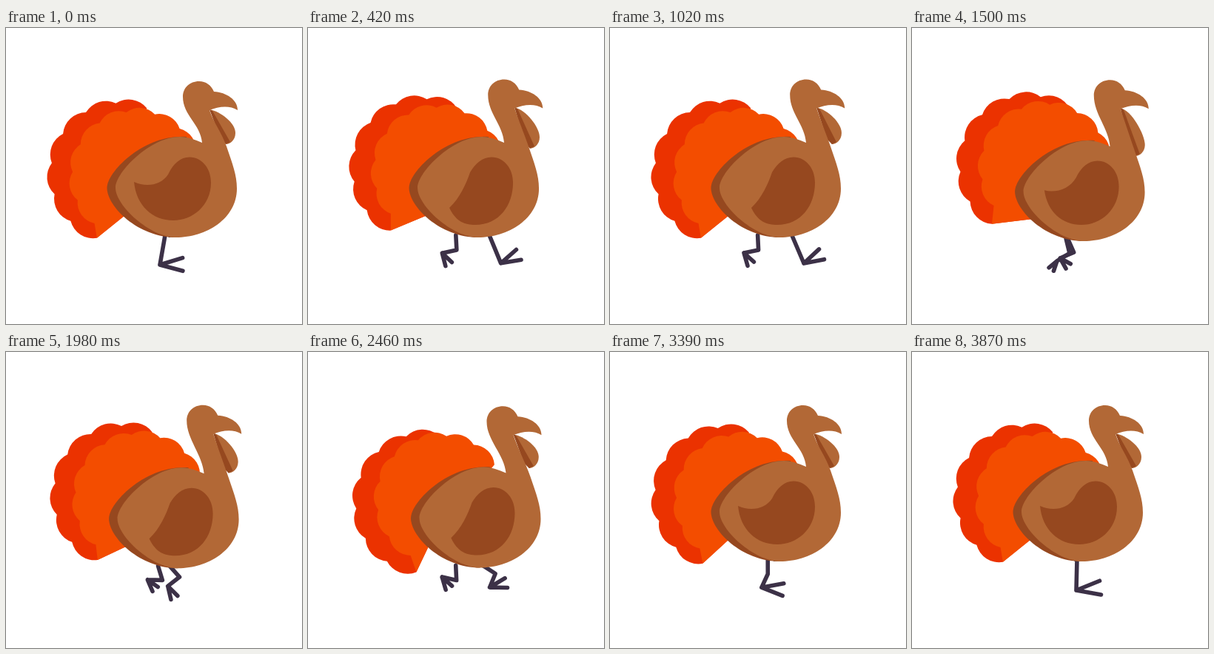
An HTML page that plays this animation: 400 by 400 pixels, repeating every 5960 ms.

```html
<!DOCTYPE html>
<html lang="en">
<head>
<meta charset="utf-8">
<title>Walking turkey</title>
<style>
html, body { margin: 0; height: 100%; overflow: hidden; background: #fff; }
svg { display: block; width: 100vw; height: 100vh; }
.leg { fill: none; stroke: #3c3147; stroke-width: 5.6; stroke-linecap: round; stroke-linejoin: round; }
.skin { fill: #b26836; }
.shade { fill: #96481f; }
</style>
</head>
<body>
<svg viewBox="0 0 400 400">
  <path id="fan" fill="#eb3200"/>
  <path id="fanTop" fill="#f34d00"/>
  <path id="legB" class="leg"/>
  <path id="legA" class="leg"/>
  <path id="back" class="shade"/>
  <path id="wattle" class="skin"/>
  <path id="fold" class="shade"/>
  <path id="body" class="skin"/>
  <path id="wing" class="shade"/>
</svg>
<script>
const LOOP = 5960, STEP = 30, LAST = 129, STRIDES = 7;
const BONE = 20, LOBE = 26;

// Foot poses: ankle x and y, tilt in degrees, toe length.
const foot = {
  reach:  [262, 318, -27, 28],
  land:   [246, 318, -16, 24],
  stand:  [222, 322, -6, 34],
  push:   [208, 320, -1, 32],
  trail:  [181, 304, 58, 18],
  gather: [200, 311, 45, 16],
  fold:   [196, 315, 125, 14],
  tuck:   [218, 266, 0, 8]
};
const gait = {
  legA: [[0, 'push'], [.4, 'trail'], [.69, 'gather'], [.76, 'reach'], [.83, 'reach'], [.946, 'stand'], [1, 'push']],
  legB: [[0, 'tuck'], [.4, 'land'], [.69, 'fold'], [.76, 'trail'], [.83, 'trail'], [.946, 'tuck'], [1, 'tuck']]
};

const ramp = (a, b, u) => {
  const s = Math.min(1, Math.max(0, (u - a) / (b - a)));
  return s * s * (3 - 2 * s);
};
const hump = (u, a, b, c, d) => ramp(a, b, u) - ramp(c, d, u);
const mix = (a, b, s) => a + (b - a) * s;

const set = (id, d) => document.getElementById(id).setAttribute('d', d);

const shift = (path, dx, dy) =>
  path.replace(/([\d.]+) ([\d.]+)/g, (m, x, y) => `${+x + dx} ${+y + dy}`);

const polar = (x, y, r, deg) => {
  const a = deg * Math.PI / 180;
  return `${x + r * Math.cos(a)} ${y + r * Math.sin(a)}`;
};

function scallops(x, y, r, start, count) {
  const bump = r / 3;
  let d = 'L' + polar(x, y, r, start);
  for (let i = 1; i <= count; i++)
    d += `A${bump} ${bump} 0 0 1 ${polar(x, y, r, start + LOBE * i)}`;
  return d + 'Z';
}

// Hip and ankle joined by two equal bones, knee bent forward.
function leg(id, u, bodyY) {
  const steps = gait[id], i = steps.findIndex(s => s[0] > u);
  const [from, a] = steps[i - 1], [to, b] = steps[i], s = ramp(from, to, u);
  const [x, y, tilt, len] = foot[a].map((v, k) => mix(v, foot[b][k], s));
  const hipX = 223 + .57 * (x - 222), hipY = 280 + bodyY;
  const dx = x - hipX, dy = y - hipY, dist = Math.hypot(dx, dy);
  const bend = Math.sqrt(Math.max(0, BONE * BONE - dist * dist / 4)) / dist * Math.sign(dy);
  const kneeX = (hipX + x) / 2 + dy * bend, kneeY = (hipY + y) / 2 - dx * bend;
  set(id, `M${hipX} ${hipY}L${kneeX} ${kneeY}L${x} ${y}`
    + `M${polar(x, y, len, tilt - 16)}L${x} ${y}L${polar(x, y, len, tilt + 16)}`);
}

function drawFan(u, dx, torso) {
  const sway = ramp(0, .385, u) - 2 * ramp(.385, .69, u) + ramp(.69, .83, u);
  const x = 155 + 1.6 * dx, y = 195.5 + 9.5 * sway, turn = 110 - 13 * sway;
  const root = torso('M161 253');
  set('fan', root + scallops(x, y, 94, turn, 7));
  set('fanTop', root + 'L' + polar(x, y, 94, turn)
    + scallops(x + 21, y + 3.5 - 9 * Math.max(0, sway), 86, turn + 21, 8));
}

function draw(u) {
  const dx = 2.6 * hump(u, .38, .42, .69, .76);
  const dy = 9.2 * hump(u, .34, .43, .64, .75);
  const nod = hump(u, .42, .65, .83, .94);
  const headX = dx + 4.2 * nod, headY = .15 * dy - 2.5 * nod;
  const droop = 16 * hump(u, .45, .69, .7, .79);
  const flap = hump(u, .34, .42, .58, .72) + hump(u, .68, .75, .84, .94);

  const torso = path => shift(path, dx, dy);
  const head = path => shift(path, headX, headY);
  const hang = path => shift(path, headX * .7, droop);

  drawFan(u, dx, torso);
  for (const id in gait) leg(id, u, dy);

  set('back', torso('M244 147 C187 143 136.500 194 136.500 216 C136.500 241 178 283 230 283Z'));
  set('wattle', head('M275 110') + 'C' + head('290 113 ') + hang('310 128 310 142')
    + hang('C310 151 303 157 297 157Z'));
  set('fold', head('M275 110L279 112') + hang('L303 154L297 157L290 150Z'));
  set('body', torso('M265 155') + 'C' + torso('263 130 ') + head('239 118 239 93')
    + head('C239 81 248 72 261 72C270 72 277 77 281 86C298 87 313 97 313 111C302 104 287 106 275 111')
    + 'C' + head('281 129 ') + torso('291 140 298 160')
    + torso('C306 184 312 198 312 217C312 258 270 283 230 283C195 283 148 240 148 216'
      + 'C148 195 195 147 235 147C246 147 255 151 265 155Z'));

  // The wing tip drops and its curved edge straightens with the flap.
  const at = (x, y, mx, my) => `${x + mx * flap} ${y + my * flap} `;
  set('wing', torso('M' + at(173, 208, 18, 35) + 'C' + at(190, 216, 15, 14) + at(210, 212, 4, -2)
    + at(219, 198, 0, -3) + 'C226 183 236 174.500 248 174.500 C265 174.500 277 190 277 209 '
    + 'C277 240 ' + at(252, 260, 6, 6) + at(226, 260, 0, 6)
    + 'C' + at(198, 260, 14, 6) + at(176, 240, 24, 22) + at(173, 208, 18, 35) + 'Z'));
}

function tick(now) {
  const step = Math.min(LAST, Math.floor(now % LOOP / STEP));
  draw(step * STRIDES / (LAST + 1) % 1);
  requestAnimationFrame(tick);
}
draw(0);
requestAnimationFrame(tick);
</script>
</body>
</html>
```
